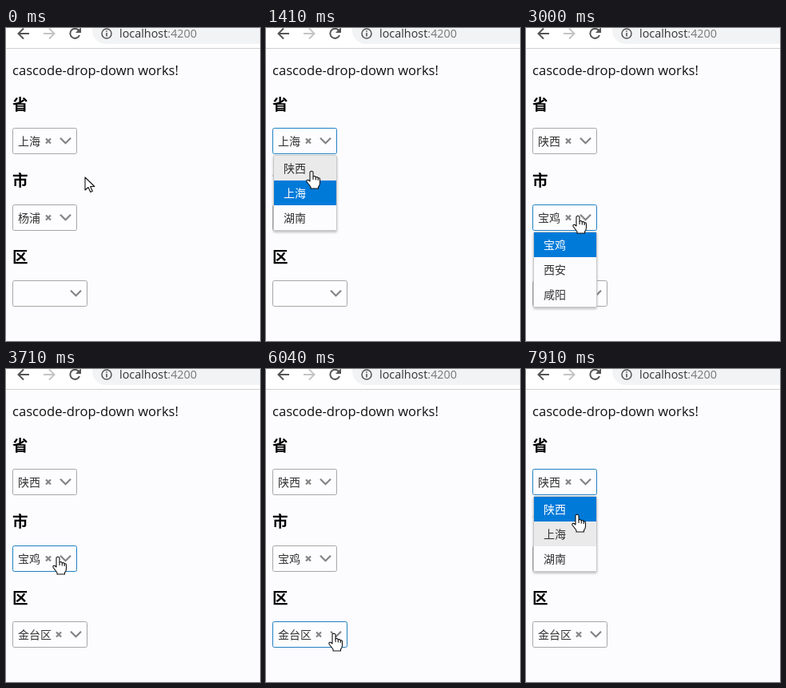
Recreate the animation shown at these times as an HTML page. Size 318 px wide and 392 px high, loop 8 s.

```html
<!DOCTYPE html>
<html lang="zh-CN">
<head>
<meta charset="utf-8">
<style>
html, body { margin: 0; width: 100%; height: 100%; overflow: hidden; background: #fcfcff; }
svg { display: block; width: 318px; height: 392px; }
text { font: 14px "Noto Sans CJK SC", "Noto Sans CJK", sans-serif; fill: #333; }
.latin { font-family: "Open Sans", "Noto Sans", sans-serif; }
.intro { font-size: 16.6px; fill: #111; }
.address { font-size: 14.4px; fill: #333; }
.heading { font-size: 19.5px; font-weight: 700; fill: #000; }
.icon { fill: none; stroke: #555; stroke-width: 2; }
.list { fill: #fcfcff; stroke: #c8c8c8; filter: drop-shadow(0 2px 1.5px #7777); }
.mark { fill: none; stroke: #848484; stroke-width: 2.2; }
.pointer { fill: #fff; stroke: #111; stroke-width: 1.1; stroke-linejoin: round; }
</style>
</head>
<body>
<svg viewBox="0 0 318 392">
  <rect width="318" height="25" fill="#fff"/>
  <path d="M318-14H125a17 17 0 0 0 0 34H318Z" fill="#f1f3f4"/>
  <path d="M0 25.5H318" stroke="#cfcfcf"/>
  <path class="icon" d="M29 7H16M22 0.5L15.5 7L22 13.5"/>
  <path class="icon" d="M47 7H60M54 0.5L60.5 7L54 13.5" style="stroke:#c4c4c4"/>
  <path class="icon" d="M91 3A6 6 0 1 0 92 9"/>
  <path d="M94 -1V6H87Z" fill="#555"/>
  <circle class="icon" cx="126" cy="7" r="6" style="stroke-width:1.5"/>
  <path class="icon" d="M126 6V10.5M126 3.2V4.8" style="stroke-width:1.6"/>
  <text class="latin address" x="142" y="12">localhost<tspan fill="#777">:4200</tspan></text>
  <text class="latin intro" x="8" y="59">cascode-drop-down works!</text>
  <text class="heading" x="8" y="103">省</text>
  <text class="heading" x="8" y="198">市</text>
  <text class="heading" x="8" y="294">区</text>
  <g id="form"></g>
  <g id="pointer" class="pointer"></g>
</svg>
<script>
const LOOP = 8000;
const ROW = 31;
const selects = [
  { y: 125, width: 80, options: ['陕西', '上海', '湖南'] },
  { y: 221, width: 80, options: ['宝鸡', '西安', '咸阳'] },
  { y: 316, width: 93, options: ['金台区', '渭滨区', '陈仓区'] },
];

// [time, x, y] of the pointer tip
const path = [
  [0, 99, 187], [250, 99, 187], [750, 77, 146], [950, 77, 146],
  [1300, 57, 179], [1680, 57, 179], [2200, 65, 235], [4150, 65, 235],
  [4600, 85, 331], [6100, 85, 331], [6900, 84, 149], [7250, 84, 149],
  [7600, 64, 198], [7720, 64, 198], [7880, 64, 182], [8000, 64, 182],
];

// Each step overrides the fields it names.
const steps = [
  [0, { values: ['上海', '杨浦', ''], focus: -1, open: -1, active: -1 }],
  [850, { focus: 0, open: 0 }],
  [1220, { active: 0 }],
  [1680, { values: ['陕西', '宝鸡', '金台区'], open: -1, active: -1 }],
  [2650, { focus: 1, open: 1 }],
  [3550, { open: -1 }],
  [4800, { focus: 2, open: 2 }],
  [5650, { open: -1 }],
  [7250, { focus: 0, open: 0 }],
  [7580, { active: 1 }],
];

const form = document.getElementById('form');
const pointer = document.getElementById('pointer');
const arrow = '<path d="M0 0V16L4 12.5L6.8 18.5L9.3 17.3L6.6 11.5H11.8Z"/>';
const hand = '<path d="M-2 1.5Q0-1 2 1.5V7Q4 5.5 5.3 8Q7 6.5 8.2 9Q10.5 8 10.5 11V15Q10.5 18 8.5 20V22H-1V20L-6 13.5Q-6.5 10.5-3.8 11.5L-2 13Z"/>' +
  '<path d="M2 7V11M5.3 8V11.5M8.2 9V12" fill="none"/>';

function stateAt(time) {
  return Object.assign({}, ...steps.filter(([start]) => start <= time).map(([, change]) => change));
}

function pointerAt(time) {
  const i = path.findIndex(([end]) => end > time);
  const [t0, x0, y0] = path[i - 1];
  const [t1, x1, y1] = path[i];
  const p = (time - t0) / (t1 - t0);
  const ease = p * p * (3 - 2 * p);
  return { x: x0 + (x1 - x0) * ease, y: y0 + (y1 - y0) * ease };
}

const isOver = ({ y, width }, point) =>
  point.x >= 8 && point.x <= 9 + width && point.y >= y && point.y <= y + 33;

function drawSelect({ y, width }, value, border) {
  const right = 8.5 + width;
  const middle = y + 16.5;
  const cross = right - 35.5;
  const clear = value && `M${cross - 3} ${middle - 3}l6 6m0-6l-6 6`;
  return `<rect x="8.5" y="${y + .5}" width="${width}" height="32" rx="2" fill="#fdfdff" stroke="${border}"/>
    <text x="15" y="${y + 22}">${value}</text>
    <path class="mark" d="${clear}M${right - 20.5} ${middle - 3.8}l6.5 6.5l6.5-6.5"/>`;
}

function drawList({ y, width, options }, value, active) {
  const top = y + 34;
  const rows = options.map((option, i) => {
    const selected = option === value;
    const fill = selected ? '#007ad9' : i === active ? '#eaeaea' : 'none';
    const rowY = top + 1 + i * ROW;
    return `<rect x="10" y="${rowY}" width="${width - 2}" height="${ROW}" fill="${fill}"/>
      <text x="22" y="${rowY + 21}"${selected ? ' style="fill:#fff"' : ''}>${option}</text>`;
  });
  return `<rect class="list" x="9.5" y="${top + .5}" width="${width - 1}" height="${options.length * ROW + 1}" rx="1"/>${rows.join('')}`;
}

let shown = '';
function render(now) {
  const time = now % LOOP;
  const { values, focus, open, active } = stateAt(time);
  const point = pointerAt(time);
  const hovered = selects.findIndex(select => isOver(select, point));
  const border = i => i === focus ? '#1f7fc0' : i === hovered ? '#212121' : '#a6a6a6';
  let markup = selects.map((select, i) => drawSelect(select, values[i], border(i))).join('');
  if (open >= 0) markup += drawList(selects[open], values[open], active);
  if (markup !== shown) form.innerHTML = shown = markup;

  const overList = open >= 0 && point.x < 9 + selects[open].width && point.y > selects[open].y;
  pointer.innerHTML = hovered >= 0 || overList ? hand : arrow;
  pointer.setAttribute('transform', `translate(${point.x.toFixed(1)} ${point.y.toFixed(1)})`);
  requestAnimationFrame(render);
}
render(performance.now());
</script>
</body>
</html>
```
